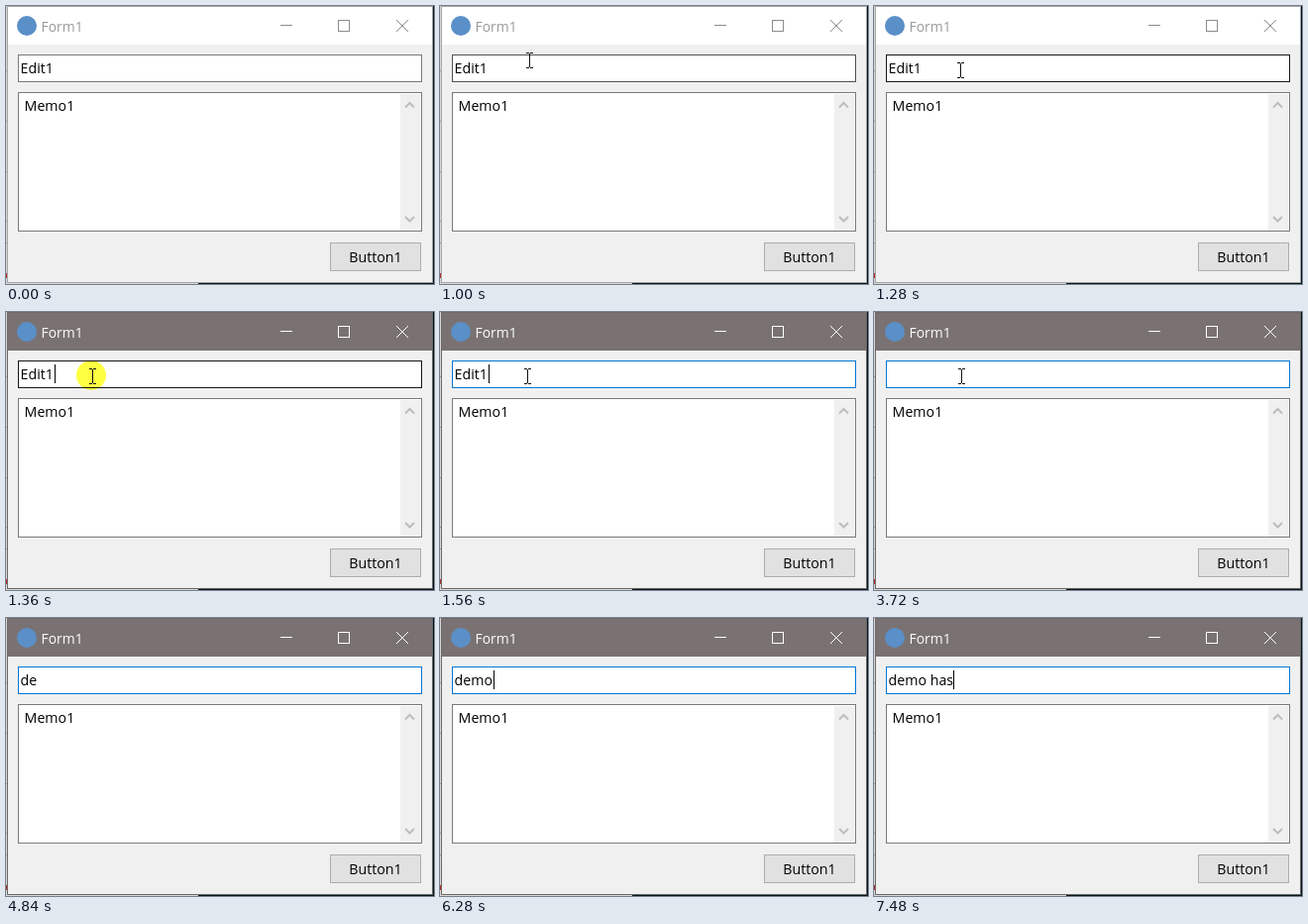
These frames come from a looping animation (432 by 281 pixels, 8000 ms). An HTML page:

```html
<!DOCTYPE html>
<html lang="en">
<head>
<meta charset="utf-8">
<title>Form1</title>
<style>
  html, body { margin: 0; width: 100%; height: 100%; overflow: hidden; background: #f0f0f0; }
  svg { display: block; width: 432px; height: 281px; }
  text { font: 14.2px "Open Sans", "Noto Sans", sans-serif; white-space: pre; }
  .crisp { shape-rendering: crispEdges; }
  .line { fill: none; }

  #bar { fill: #fff; }
  #frame { stroke: #a8a8a8; }
  #title { fill: #999; font-size: 13.9px; }
  #controls { stroke: #8c8c8c; }
  .active #bar { fill: #7a7272; }
  .active #frame { stroke: #6f6969; }
  .active #title { fill: #fff; }
  .active #controls { stroke: #fff; }
</style>
</head>
<body>
<svg id="stage" viewBox="0 0 432 281">
  <!-- desktop behind the window -->
  <rect width="194" height="281" fill="#d6d6d6"/>
  <rect x="194" width="238" height="281" fill="#02161c"/>
  <path class="crisp" d="M0 65.5h1M0 116.5h1M0 167.5h1M0 217.5h1M0 239.5h1" stroke="#999"/>
  <path class="crisp" d="M0 270v5" stroke="#b03030" stroke-width="2"/>

  <!-- window -->
  <rect x="1" y="1" width="430" height="279" fill="#f0f0f0"/>
  <rect id="bar" x="1" y="1" width="430" height="38"/>
  <rect id="frame" class="line crisp" x="1.5" y=".5" width="429" height="279"/>
  <circle cx="21" cy="20" r="10" fill="#5a8fc8"/>
  <text id="title" x="35.5" y="26">Form1</text>
  <g id="controls" class="line">
    <path class="crisp" d="M277 19.5h12M335.5 14.5h11v11h-11z"/>
    <path d="M394 14l12 12M406 14l-12 12"/>
  </g>

  <!-- edit -->
  <rect id="edit" class="crisp" x="12.5" y="49.5" width="407" height="27" fill="#fff"/>
  <text id="value" x="14.6" y="68"></text>
  <rect id="caret" class="crisp" y="53" width="1" height="19"/>

  <!-- memo -->
  <rect class="crisp" x="12.5" y="87.5" width="407" height="140" fill="#fff" stroke="#7a7a7a"/>
  <text x="18.6" y="106">Memo1</text>
  <rect x="398" y="89" width="20" height="138" fill="#f0f0f0"/>
  <path class="line" d="M403 102.5l4.5-4.500 4.500 4.500M403 213l4.500 4.500 4.500-4.500" stroke="#bdbdbd" stroke-width="2"/>

  <!-- button -->
  <rect class="crisp" x="327.5" y="239.500" width="91" height="28" fill="#e1e1e1" stroke="#adadad"/>
  <text x="373" y="259" text-anchor="middle">Button1</text>

  <!-- pointer -->
  <g id="pointer">
    <circle id="click" cx="-1" cy="-1" r="15" fill="#ffff42" style="mix-blend-mode:multiply"/>
    <path id="beam" class="line crisp" d="M-3-7.500h3M1-7.500h3M.5-7v14M-3 7.500h3M1 7.500h3" stroke="#111"/>
    <path id="arrow" d="M.5.5v16l3.700-3.500 2.500 5.500 2.300-1-2.500-5.500h5z" fill="#fff" stroke="#000"/>
  </g>
</svg>
<script>
const LOOP = 8000, ENTER = 720, CLICK = 1320, RELEASE = 1480, FOCUS = 1560, HIDE = 4200;

// [time, text, caret x]; no caret x means the caret is off
const typing = [
  [0, "Edit1"], [CLICK, "Edit1", 49], [2080, "Edit1"],
  [2560, "Edit", 41], [2760, "Edi", 36], [2920, "Ed", 32], [3000, "E", 23],
  [3200, "", 15], [3720, ""],
  [4200, "d", 24], [4360, "de", 32], [4840, "de"],
  [5120, "dem", 45], [5280, "demoh", 63], [5760, "demoh"],
  [6280, "demo", 54], [6400, "demo ", 58], [6920, "demo "],
  [7120, "demo h", 67], [7200, "demo ha", 74], [7480, "demo has", 80]
];

// [time, x, y]
const path = [[ENTER, 104, 4], [840, 98, 30], [1000, 90, 55], [1160, 87, 64], [1360, 87, 65], [RELEASE, 88, 65]];

const el = id => document.getElementById(id);
const show = (id, on) => el(id).setAttribute("visibility", on ? "visible" : "hidden");
const clamp = v => Math.min(1, Math.max(0, v));

function pointerAt(t) {
  const i = path.findIndex(p => p[0] > t);
  if (i < 0) return path[path.length - 1].slice(1);
  const a = path[Math.max(0, i - 1)], b = path[i];
  const k = clamp((t - a[0]) / (b[0] - a[0] || 1));
  return [1, 2].map(n => Math.round(a[n] + (b[n] - a[n]) * k));
}

function borderAt(t) {
  if (t >= FOCUS) return "#0078d7";
  const grey = Math.round(122 - 99 * clamp((t - 920) / 200));
  return `rgb(${grey},${grey},${grey})`;
}

function draw(t) {
  el("stage").classList.toggle("active", t >= CLICK);
  el("edit").setAttribute("stroke", borderAt(t));

  const [, text, caretX] = typing.filter(s => s[0] <= t).pop();
  if (el("value").textContent !== text) el("value").textContent = text;
  show("caret", caretX);
  if (caretX) el("caret").setAttribute("x", caretX);

  const [x, y] = pointerAt(t);
  const visible = t >= ENTER && t < HIDE;
  el("pointer").setAttribute("transform", `translate(${x} ${y})`);
  show("beam", visible && y >= 49);
  show("arrow", visible && y < 49);
  show("click", t >= CLICK && t < RELEASE);
}

const start = performance.now();
function tick(now) {
  draw(Math.max(0, now - start) % LOOP);
  requestAnimationFrame(tick);
}
draw(0);
requestAnimationFrame(tick);
</script>
</body>
</html>
```
